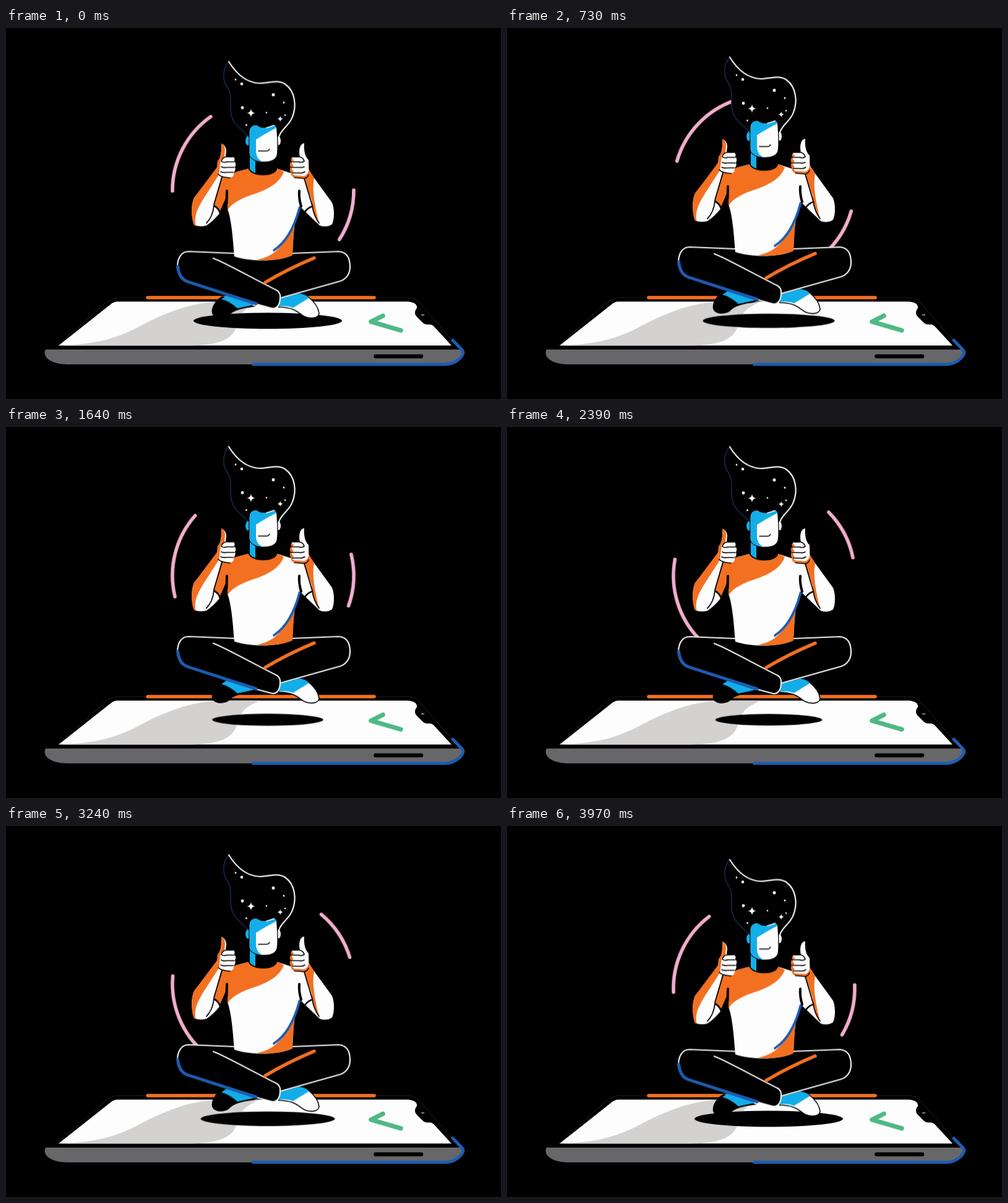
An HTML page without scripts that plays this animation: 800x600 px, repeating every 4 s.

```html
<!DOCTYPE html>
<html lang="en">
<head>
<meta charset="utf-8">
<title>Floating thumbs up</title>
<style>
  html, body { margin: 0; width: 100%; height: 100%; overflow: hidden; background: #000; }
  svg { display: block; width: 100vw; height: 100vh; }

  .w { fill: #fdfdfd; }
  .o { fill: #f37021; }
  .c { fill: #12aeea; }
  .line { fill: none; stroke-linecap: round; stroke-linejoin: round; }
  .white { stroke: #f0f0f0; stroke-width: 2.2; }
  .ink { stroke: #000; stroke-width: 1.8; }
  .thin { stroke: #000; stroke-width: 1.6; }
  .cuff { stroke: #000; stroke-width: 2.6; }
  .orange { stroke: #f37021; stroke-width: 5.5; }
  .blue { stroke: #1d5cb0; stroke-width: 5; }
  .pink { stroke: #f2aecd; stroke-width: 5.6; }
  .green { stroke: #4fb985; stroke-width: 7.5; }

  .float { animation: float 4s infinite cubic-bezier(.37, 0, .63, 1); }
  @keyframes float {
    0%, 100% { transform: translateY(.4px); }
    50% { transform: translateY(-24.1px); }
  }

  .shadow { transform-origin: 423px 473.5px; animation: shrink 4s infinite; }
  @keyframes shrink {
    0% { transform: scale(1); animation-timing-function: linear; }
    50% { transform: scale(.692); animation-timing-function: cubic-bezier(.37, 0, .63, 1); }
    100% { transform: scale(1); }
  }

  .swing { transform-origin: 415.5px 262.5px; animation: swing 4s -3.5s infinite cubic-bezier(.37, 0, .63, 1); }
  @keyframes swing {
    0%, 100% { transform: rotate(17.5deg); }
    62.5% { transform: rotate(-54.5deg); }
  }
</style>
</head>
<body>
<svg viewBox="0 0 800 600">
  <rect width="800" height="600"/>

  <!-- phone -->
  <path class="line" stroke="#1f1f1f" d="M84 513 L160 445 Q171 436 182 436 H648 Q661 436 667 443 L721 505"/>
  <path class="w" d="M85 513.5 L169 447 Q174 442.5 180 442.5 H649 C659 443 665 447 664 453 C660 458 660 463 664 467 L674 477 C680 482 685 477 691 482 L720 513.5 Z"/>
  <path fill="#d4d1d1" d="M85 513.5 C140 512 174 504 211 485 C258 460 300 443 350 442.5 H410 C388 452 380 460 375 475 C370 495 362 513 296 513.5 Z"/>
  <ellipse cx="673.5" cy="464" rx="3" ry="1.2" fill="#777"/>
  <path fill="#676769" d="M64 520 H738 C740 534 724 544 700 544 H98 C74 543 60 534 63 522 Z"/>
  <path class="line" stroke="#000" stroke-width="6.5" d="M597.5 531 H671"/>
  <path class="line blue" d="M399.5 544 H708 C721 544 733 538 738 528 Q740 524 737 520.5 L722 505"/>
  <path class="line orange" d="M229 436 H595"/>
  <path class="line green" d="M609 465.5 L590 475 L638 489"/>
  <ellipse class="shadow" cx="423" cy="473.5" rx="120" ry="13"/>

  <g class="float">
    <g class="swing line pink">
      <path d="M269 262.5 A146.5 146.5 0 0 1 331.5 142.5"/>
      <path d="M562 262.5 A146.5 146.5 0 0 1 538.4 342.3"/>
    </g>

    <!-- feet -->
    <path d="M350 433 C338 439 331 452 333 461 C336 470 351 471 360 465 C368 456 380 453 404 450 Z"/>
    <path class="c" d="M348 438 L360 430 L406 446 L374 453 Q361 441 348 438 Z"/>
    <path class="w" stroke="#000" stroke-width="1.6" d="M488 434 C498 442 505 452 506 461 C505 470 491 470 482 466 C474 462 468 451 441 451 L443 437 L474 429 Z"/>
    <path class="c" d="M443 437 L474 429 Q484 430 490 436 L464 452 Q454 448 441 450 Z"/>

    <!-- legs -->
    <path d="M295 361 L369 364 H463 L538 361 C552 362 556 374 556 386 C556 398 549 406 540 409 L443 437 C443 447 438 453 430 453 L294 410 C282 406 277 396 277 386 C277 370 285 361 295 361 Z"/>
    <g class="line white">
      <path d="M369 364 L295 361 C284 361 277 371 277 386"/>
      <path d="M463 364 L538 361 C552 362 556 374 556 386 C556 398 549 406 540 409 L444 436"/>
      <path d="M335 372 C350 377 400 405 438 424 Q444 428 443 436 C443 447 438 454 430 453 L404 446"/>
    </g>
    <path class="line blue" d="M277.5 385 C279 400 285 407 294 410 L404 445.5"/>
    <path class="line orange" d="M419 411 Q456 389 498 371.5"/>

    <!-- shirt -->
    <path class="w" d="M393 227 C375 231 360 236 350 241 L358 264 V292 C365 312 367 345 369 369 C395 378 440 378 463 367 C464 330 467 305 475 288 L484 297 L496 288 L481 240 C468 236 452 232 438 227 Z"/>
    <path class="o" d="M393 227 C375 231 360 236 349 241 L336 285 Q345 291 347 298 L358 275 V295 C364 282 385 273 404 267 C428 259 444 247 449 232 L438 227 Z"/>
    <path class="o" d="M405 374.5 C440 368 451 345 466 316 L463 367 C445 375 425 376 405 374.5 Z"/>
    <path class="line" stroke="#1d5cb0" stroke-width="3.8" d="M433 359 C453 346 466 322 474.5 290"/>
    <path d="M344 300 L358 268 V294 Z"/>
    <path class="line" stroke="#000" stroke-width="4" d="M357 263 L356.5 283 M474 263 Q473 275 477 288"/>

    <!-- neck and head -->
    <path d="M392 205 H438 V228 C434 241 398 241 392 228 Z"/>
    <path class="c" d="M394 208 H403 V234 Q397 232 394 228 Z"/>
    <path d="M360 54 C370 70 385 88 410 89 C425 89 440 82 452 91 C467 102 470 125 463 143 C458 158 445 163 441 176 H391 C388 167 374 163 367 148 C358 130 368 110 358 96 C349 85 350 65 360 54 Z"/>
    <path class="line" stroke="#173462" stroke-width="1.3" d="M360 54 C350 65 349 85 358 96 C368 110 358 130 367 148 C374 163 388 167 391 176"/>
    <path class="line white" d="M360 54 C370 70 385 88 410 89 C425 89 440 82 452 91 C467 102 470 125 463 143 C458 158 444 163 441 176"/>
    <ellipse class="c" cx="391" cy="182" rx="4" ry="7.5"/>
    <ellipse class="w" cx="440.5" cy="182" rx="3.5" ry="7"/>
    <path class="w" stroke="#000" stroke-width="1.3" d="M393 168 C393 160 399 155 406 157 C413 163 423 161 430 157 C436 155 438 159 438 165 C439 180 440 197 438 206 C436 213 428 216.5 416 216.5 C404 216 394 211 393 203 Z"/>
    <path class="c" d="M394 168 C394 160 399 156 406 157.5 C413 163 423 161 430 157.5 Q436 156 437 161 Q418 171 404 180 V198 C404 207 408 214 416 216 C404 215.5 394 210 394 203 Z"/>
    <path class="line" stroke="#fdfdfd" stroke-width="1.8" d="M421 161 Q428 159 433 157"/>
    <path class="line thin" d="M408 198.5 H419 Q425 199 425.5 195.5"/>
    <g class="w">
      <circle cx="371" cy="83" r="1.4"/>
      <circle cx="381" cy="90" r="2.3"/>
      <circle cx="432" cy="107.5" r="2.5"/>
      <circle cx="449" cy="120" r="1.5"/>
      <circle cx="382" cy="128.5" r="2.4"/>
      <circle cx="421" cy="136.5" r="1.3"/>
      <circle cx="451" cy="140.5" r="1.3"/>
      <circle cx="388.5" cy="156.5" r="1.4"/>
      <path id="star" d="M396 130 Q396.5 136.5 403 137 Q396.5 137.5 396 144 Q395.5 137.5 389 137 Q395.5 136.5 396 130 Z"/>
      <use href="#star" transform="translate(166 50.5) scale(.7)"/>
    </g>

    <!-- left arm -->
    <path class="w" d="M342 228 L304 274 C299 285 299 303 304 318 Q313 322 324 319 Q335 312 347 297 L336 286 L348 241 Z"/>
    <path class="o" d="M343 222 L304 274 C299 285 299 303 303 317 L307 320 C302 302 313 285 326 265 L344 237 Z"/>
    <path class="line ink" d="M349 241 L336 285 M336 287 Q334 305 324 315"/>
    <path class="line cuff" d="M336 287 Q344 291 346 299"/>
    <path class="w" d="M348 187 Q355 188 356 198 L355 208 H366 Q371 209 369 215 Q373 219 370 224 Q372 230 368 233 Q369 241 362 241.5 L346 240 L341 233 L342 215 Q349 208 348 187 Z"/>
    <path class="o" d="M348 186 Q354 188 354 198 L353 208 L347 213 L344 238 L341 233 L342 215 Q350 206 348 186 Z"/>
    <path class="line thin" d="M355 208 Q349 210 348 215 Q351 218 357 216 H369 M348 224 Q351 226 357 225 H369 M347 232 Q351 234 357 233 H367 M355 208 H366 M343 236 Q347 241 362 242"/>

    <!-- right arm -->
    <path class="w" d="M489 229 L498 242 L527 282 C531 292 531 308 527 317 Q518 323 507 319 L483 296 L495 288 L482 243 Z"/>
    <path class="o" d="M488 226 L498 242 C494 262 499 286 506 316 C497 305 495 290 494 278 L482 243 Z"/>
    <path class="line ink" d="M482 243 L495 287 Q497 303 506 315"/>
    <path class="line cuff" d="M483 297 Q488 290 495 288"/>
    <path class="o" d="M475 208 H464 Q459 210 461 215 Q457 220 460 224 Q457 230 461 234 Q460 240 466 241 L484 243 L490 236 L489 214 Z"/>
    <path class="w" d="M475 208 C473 198 474 187 482 186 C481 196 483 208 489 213 L489 231 Q487 238 481 239 L467 238 Q463 237 463 234 L465 231 Q460 228 463 224 L465 222 Q460 219 463 215 L466 213 Q460 211 464 208 Z"/>
    <path class="line thin" d="M475 208 Q481 210 482 215 Q478 218 473 216 H461 M482 224 Q478 226 473 225 H461 M483 232 Q479 235 473 234 H463 M475 208 H464 M466 241.5 L482 243 Q487 242 489 237"/>
  </g>
</svg>
</body>
</html>
```
